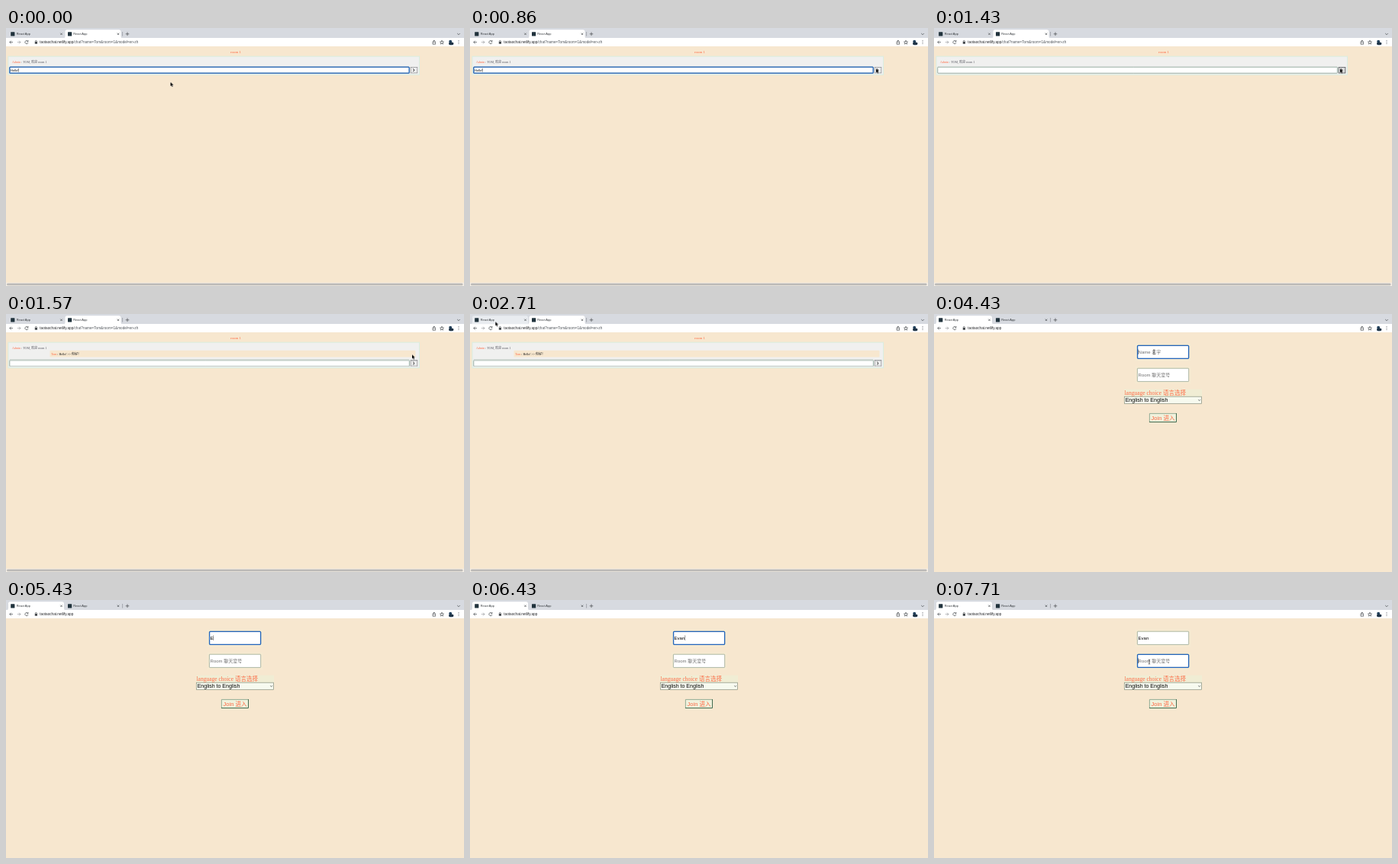
Animation of 600 by 338 pixels, one loop 8 s. Source, as an HTML page:

```html
<!DOCTYPE html>
<html lang="en">
<head>
<meta charset="utf-8">
<title>Chat demo</title>
<style>
html, body { margin: 0; width: 100%; height: 100%; overflow: hidden; background: #f7e7cf; }
svg { display: block; width: 600px; height: 338px; }
text { white-space: pre; }
.sans { font-family: "Liberation Sans", Arial, "Noto Sans CJK SC", "Noto Sans CJK", sans-serif; }
.serif { font-family: "Liberation Serif", Times, "Noto Sans CJK SC", "Noto Sans CJK", serif; }
.red { fill: #ff6a45; }
.hint { fill: #707070; }
.line { fill: none; stroke: #45494d; stroke-width: .7; }
.field { fill: #fff; stroke: #8c9c86; stroke-width: .7; }
.ring { fill: none; stroke: #2466bd; stroke-width: 1.3; }
.caret { stroke: #000; stroke-width: .5; }

/* every part shares one 8 s clock with hard steps: 1% = 80 ms */
.a { animation: 8s step-end infinite; }
.chat { animation-name: chat; }
.form { animation-name: form; }
.hover { animation-name: hover; }
.draft { animation-name: draft; }
.focus { animation-name: focus; }
.blink1 { animation-name: blink1; }
.press { animation-name: press; }
.panel { height: 24px; animation-name: grow; }
.shift { animation-name: shift; }
.reply { animation-name: reply; }
.arrow { animation-name: arrow; }
.beam { animation-name: beam; }
.nameRing { animation-name: nameRing; }
.nameHint { animation-name: nameHint; }
.nameText { animation-name: nameText; }
.typing { animation-name: typing; }
.blink2 { animation-name: blink2; }
.roomRing { animation-name: roomRing; }

@keyframes chat { 0% { opacity: 1 } 39.25%, 100% { opacity: 0 } }
@keyframes form { 0% { opacity: 0 } 39.25%, 100% { opacity: 1 } }
@keyframes hover { 0% { opacity: 0 } 33.875%, 100% { opacity: 1 } }
@keyframes draft { 0% { opacity: 1 } 16.125%, 100% { opacity: 0 } }
@keyframes focus { 0% { opacity: 1 } 14.25%, 100% { opacity: 0 } }
@keyframes blink1 { 0% { opacity: 1 } 3.625% { opacity: 0 } 8.875% { opacity: 1 } 14.25%, 100% { opacity: 0 } }
@keyframes press { 0% { opacity: 0 } 14.25% { opacity: 1 } 19.625%, 100% { opacity: 0 } }
@keyframes grow { 0% { height: 24px } 19.625%, 100% { height: 33.4px } }
@keyframes shift { 0% { transform: none } 19.625%, 100% { transform: translateY(9.4px) } }
@keyframes reply { 0% { opacity: 0 } 19.625%, 100% { opacity: 1 } }
@keyframes arrow {
  0% { transform: translate(215.5px, 71px) }
  1.75% { transform: translate(224px, 75px) }
  3.625% { transform: translate(264px, 83px) }
  5.375% { transform: translate(350px, 83px) }
  7.125% { transform: translate(445px, 75px) }
  8.875% { transform: translate(510px, 62px) }
  10.75% { transform: translate(532px, 53.3px) }
  25% { transform: translate(522px, 62px) }
  26.75% { transform: translate(455px, 54px) }
  28.625% { transform: translate(320px, 38px) }
  30.375% { transform: translate(170px, 22px) }
  32.125% { transform: translate(65px, 13px) }
  33.875% { transform: translate(33.3px, 10.2px) }
  42.875% { transform: translate(187px, 74px) }
  46.375% { transform: translate(225px, 76px) }
  48.25% { transform: translate(258px, 63px) }
  50%, 100% { transform: translate(-20px, 0) }
}
@keyframes beam {
  0% { transform: translate(-20px, 0) }
  50% { transform: translate(283px, 52px) }
  51.75% { transform: translate(288.3px, 49.7px) }
  67.875% { transform: translate(-20px, 0) }
  89.25% { transform: translate(286px, 55px) }
  91.125% { transform: translate(283px, 74.5px) }
  92.875%, 100% { transform: translate(282px, 81px) }
}
@keyframes nameRing { 0% { opacity: 0 } 55.375% { opacity: 1 } 96.375%, 100% { opacity: 0 } }
@keyframes nameHint { 0% { opacity: 1 } 67.875%, 100% { opacity: 0 } }
@keyframes nameText { 0% { opacity: 0 } 67.875%, 100% { opacity: 1 } }
@keyframes typing {
  0% { transform: none }
  67.875% { transform: translateX(4.1px) }
  73.25% { transform: translateX(7.1px) }
  78.625% { transform: translateX(10.5px) }
  80.375%, 100% { transform: translateX(14.2px) }
}
@keyframes blink2 {
  0% { opacity: 0 } 55.375% { opacity: 1 } 60.75% { opacity: 0 } 67.875% { opacity: 1 }
  85.75% { opacity: 0 } 91.125% { opacity: 1 } 96.375%, 100% { opacity: 0 }
}
@keyframes roomRing { 0% { opacity: 0 } 96.375%, 100% { opacity: 1 } }
</style>
</head>
<body>
<svg viewBox="0 0 600 338">
  <defs>
    <path id="tab" d="M0 13.2Q2 13.2 2 11V4.8Q2 2.3 4.5 2.3H72.5Q75 2.3 75 4.8V11Q75 13.2 77 13.2Z"/>
    <path id="close" class="line" d="M-1.2-1.2 1.2 1.2M1.2-1.2-1.2 1.2"/>
    <rect id="icon" width="5.2" height="5.2" rx=".5" fill="#20323c"/>
  </defs>
  <rect width="600" height="338" fill="#f7e7cf"/>

  <!-- browser -->
  <rect width="600" height="13.2" fill="#d7dae0"/>
  <rect y="13" width="600" height="11" fill="#fff"/>
  <g class="a chat">
    <use href="#tab" x="1" fill="#e9ecf0" class="a hover"/>
    <use href="#tab" x="75.5" fill="#fff"/>
  </g>
  <use href="#tab" x="1" fill="#fff" class="a form"/>
  <use href="#icon" x="6.2" y="5.2"/>
  <use href="#icon" x="81" y="5.2"/>
  <g class="sans" font-size="3.95" fill="#303438">
    <text x="13.7" y="9.2">React App</text>
    <text x="88.2" y="9.2">React App</text>
  </g>
  <use href="#close" x="72.5" y="7.8"/>
  <use href="#close" x="147" y="7.8"/>
  <path class="line" d="M152.6 5V10.6" stroke-opacity=".5"/>
  <path class="line" d="M156.7 7.8H161.3M159 5.5V10.1M591.2 7 593 8.8 594.8 7"/>
  <path class="line" d="M9 18.6H4.8M6.8 16.6 4.8 18.6 6.8 20.6M28.7 17.4A2.1 2.1 0 1 0 29 19.2M29 16V17.8H27.2"/>
  <path class="line" d="M14.8 18.6H19M17 16.6 19 18.6 17 20.6" stroke-opacity=".55"/>
  <rect x="37.8" y="18" width="3.2" height="2.7" rx=".3" fill="#45494d"/>
  <path class="line" d="M38.4 18.2V17.4A1 1 0 0 1 40.4 17.4V18.2" stroke-width=".5"/>
  <g class="sans" font-size="4.68">
    <text x="44.3" y="20.3" class="a chat" fill="#202124">taotaochat.netlify.app<tspan fill="#50555a">/chat?name=Tom&amp;room=1&amp;model=en-zh</tspan></text>
    <text x="44.3" y="20.3" class="a form" fill="#202124">taotaochat.netlify.app</text>
  </g>
  <path class="line" d="M560 17.8H559V21.2H562.6V17.8H561.6M560.8 19.6V16M559.8 17 560.8 16 561.8 17" stroke-width=".5"/>
  <path class="line" d="M571 16.2 571.7 18 573.5 18.1 572.1 19.3 572.6 21.1 571 20.1 569.4 21.1 569.9 19.3 568.5 18.1 570.3 18Z" stroke-width=".5"/>
  <circle cx="582.2" cy="17.7" r="2" fill="#24425c"/>
  <ellipse cx="583.2" cy="20.4" rx="3.2" ry="1.9" fill="#1d3346"/>
  <g fill="#45494d"><circle cx="593" cy="16.6" r=".5"/><circle cx="593" cy="18.6" r=".5"/><circle cx="593" cy="20.6" r=".5"/></g>

  <!-- chat room -->
  <g class="a chat">
    <text x="301" y="33.2" text-anchor="middle" class="serif red" font-size="4.95">room 1</text>
    <rect class="a panel" x="3" y="37.2" width="538.5" fill="#f0f0ef" stroke="#d9eee2" stroke-width="1"/>
    <text x="8" y="45.7" class="serif" font-size="4" fill="#55555f"><tspan class="red">Admin</tspan> : TOM, 欢迎 room 1</text>
    <g class="a reply">
      <rect x="57.5" y="47.7" width="479" height="8.8" rx="1" fill="#f7e7cf"/>
      <text x="59" y="53.5" class="serif" font-size="4" fill="#111"><tspan class="red">Tom</tspan> : Hello! &gt;&gt; 你好！</text>
    </g>
    <g class="a shift">
      <rect class="field" x="4.8" y="51.2" width="523.6" height="8" rx=".6" style="stroke:#6f8f80"/>
      <rect class="a focus ring" x="4.8" y="51.2" width="523.4" height="8" rx="1"/>
      <text x="6" y="56.6" class="a draft sans" font-size="4">Hello!</text>
      <path class="a blink1 caret" d="M16.7 52.8V57.6"/>
      <rect x="530.2" y="51.5" width="8.6" height="7.4" fill="#efefef" stroke="#85878a" stroke-width=".7"/>
      <rect class="a press" x="530.2" y="51.5" width="8.6" height="7.4" fill="#dcdcdc" stroke="#606468" stroke-width=".8"/>
      <path d="M533.4 53.4 534.9 55.2 533.4 57" fill="none" stroke="#111" stroke-width=".9"/>
    </g>
    <rect y="333.6" width="600" height="4.4" fill="#f4eee5"/>
    <rect x="1" y="334.6" width="597.5" height="2.6" rx="1.3" fill="#bcbab7"/>
  </g>

  <!-- join form -->
  <g class="a form">
    <g fill="#f6ead1"><rect x="263.5" y="38.5" width="73" height="23"/><rect x="263.5" y="68.5" width="73" height="23"/></g>
    <rect class="field" x="266.4" y="41.2" width="67.3" height="17.2" rx=".6"/>
    <rect class="field" x="266.4" y="71.2" width="67.3" height="17.2" rx=".6"/>
    <g class="sans" font-size="6">
      <text x="267.6" y="51.8" class="a nameHint hint">Name 名字</text>
      <text x="267.6" y="51.8" class="a nameText">Evan</text>
      <text x="267.6" y="81.8" class="hint">Room 聊天室号</text>
    </g>
    <g class="a typing">
      <rect class="a nameText" x="267.7" y="45" width="15" height="9" fill="#fff"/>
      <path class="a blink2 caret" d="M267.7 46.3V53"/>
    </g>
    <rect class="a nameRing ring" x="266.6" y="41.3" width="67" height="17" rx="1"/>
    <g class="a roomRing">
      <rect class="ring" x="266.6" y="71.3" width="67" height="17" rx="1"/>
      <path class="caret" d="M267.7 76.3V83"/>
    </g>
    <rect x="249" y="98.6" width="102" height="9.4" fill="#f0edd4"/>
    <text x="249.5" y="106.2" class="serif red" font-size="7.5">language choice 语言选择</text>
    <rect x="249.6" y="108.2" width="100.8" height="9.1" fill="#f7faef" stroke="#86907f" stroke-width=".7"/>
    <text x="250.7" y="115.4" class="sans" font-size="7">English to English</text>
    <path class="line" d="M346.2 112.1 347.6 113.6 349 112.1" stroke-width=".9"/>
    <rect x="282" y="130" width="36" height="12" fill="#f0f1dc"/>
    <path d="M282.4 142V130.4H318" fill="none" stroke="#7d9b85" stroke-width=".8"/>
    <path d="M282 141.5H317.5V130" fill="none" stroke="#426b50" stroke-width="1"/>
    <text x="300" y="138.7" text-anchor="middle" class="sans red" font-size="7.5">Join 进入</text>
  </g>

  <!-- pointers -->
  <path class="a arrow" d="M0 0V5.2L1.2 4.1 2.1 6.2 3 5.8 2.1 3.8H3.8Z" stroke="#fff" stroke-width=".5" paint-order="stroke"/>
  <path class="a beam" d="M-1.2-3Q0-3 0-2.2Q0-3 1.2-3M0-2.2V2.2M-1.2 3Q0 3 0 2.2Q0 3 1.2 3" fill="none" stroke="#333" stroke-width=".7"/>
</svg>
</body>
</html>
```
